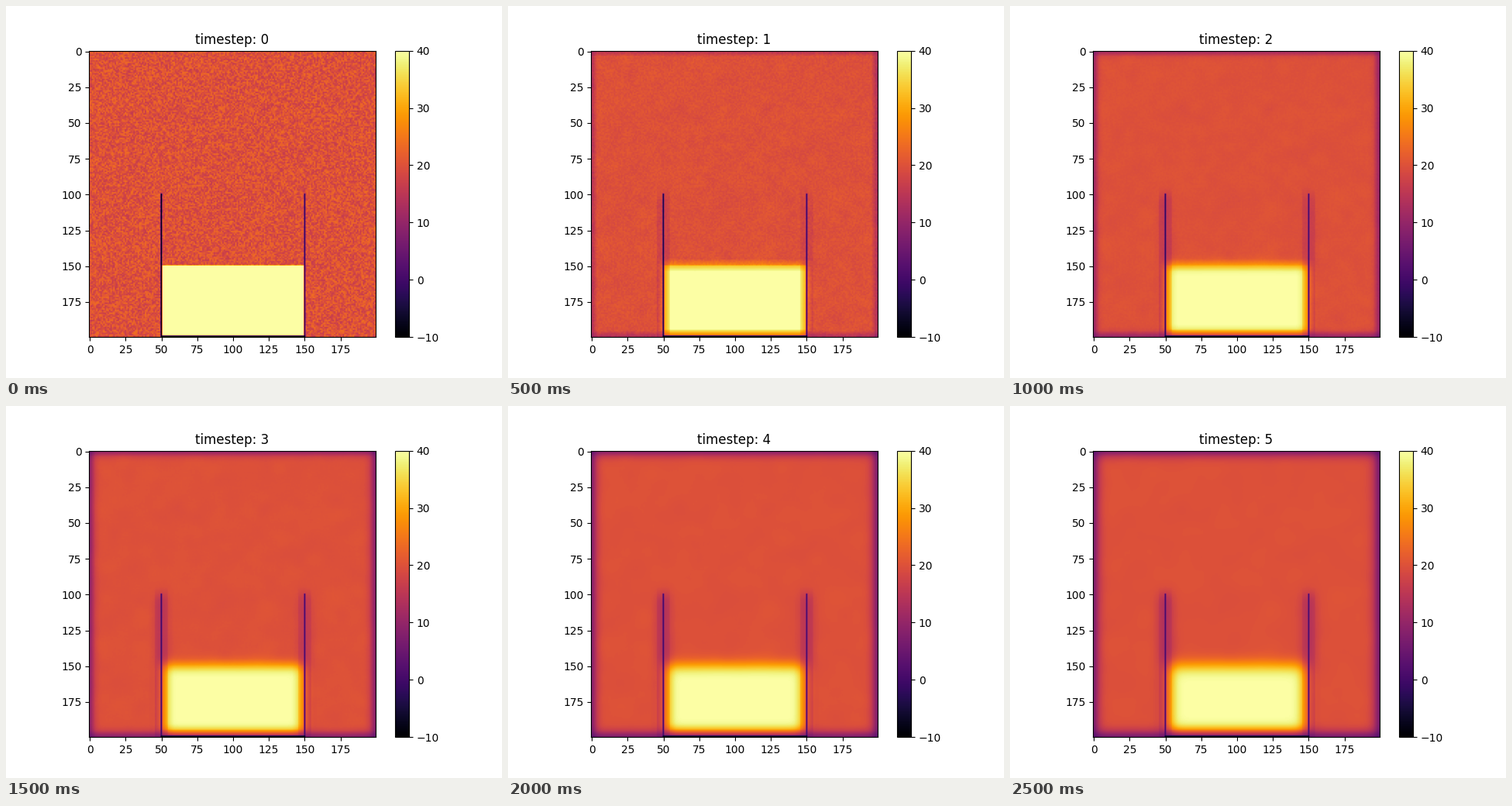
A matplotlib script for the animation above (3000 ms loop, 640 by 480 pixels).

```python
import numpy as np
import matplotlib.pyplot as plt
from matplotlib.animation import FuncAnimation

SIZE = 200
STEPS = 6
REACH = 4      # neighbourhood half-width in cells
MIX = 0.7      # share of the neighbourhood mean taken per step

LEFT = np.s_[100:, 50]
RIGHT = np.s_[100:, 150]
BOTTOM = np.s_[199, 50:151]


def box_mean(field):
    """Mean over a square neighbourhood, with zero outside the grid."""
    width = 2 * REACH + 1
    kernel = np.ones(width) / width
    for axis in (0, 1):
        field = np.apply_along_axis(np.convolve, axis, field, kernel, "same")
    return field


def start_field():
    rng = np.random.default_rng(4)
    field = rng.uniform(16, 24, (SIZE, SIZE))
    field[150:199, 51:150] = 40
    field[RIGHT] = -2
    field[LEFT] = -10
    field[BOTTOM] = -10
    return field


def step(field):
    new = field + MIX * (box_mean(field) - field)
    # the vessel warms slowly towards its own temperature
    for wall, rest in ((RIGHT, 1), (LEFT, 1), (BOTTOM, -7)):
        new[wall] = field[wall] + 0.45 * (rest - field[wall])
    return new


states = [start_field()]
while len(states) < STEPS:
    states.append(step(states[-1]))

fig, ax = plt.subplots(figsize=(6.4, 4.8), dpi=100)
image = ax.imshow(states[0], cmap="inferno", vmin=-10, vmax=40)
fig.colorbar(image)
title = ax.set_title("timestep: 0")


def draw(i):
    image.set_data(states[i])
    title.set_text(f"timestep: {i}")
    return image, title


anim = FuncAnimation(fig, draw, frames=STEPS, interval=500,
                     repeat=True, repeat_delay=0, blit=False)
plt.show()
```
